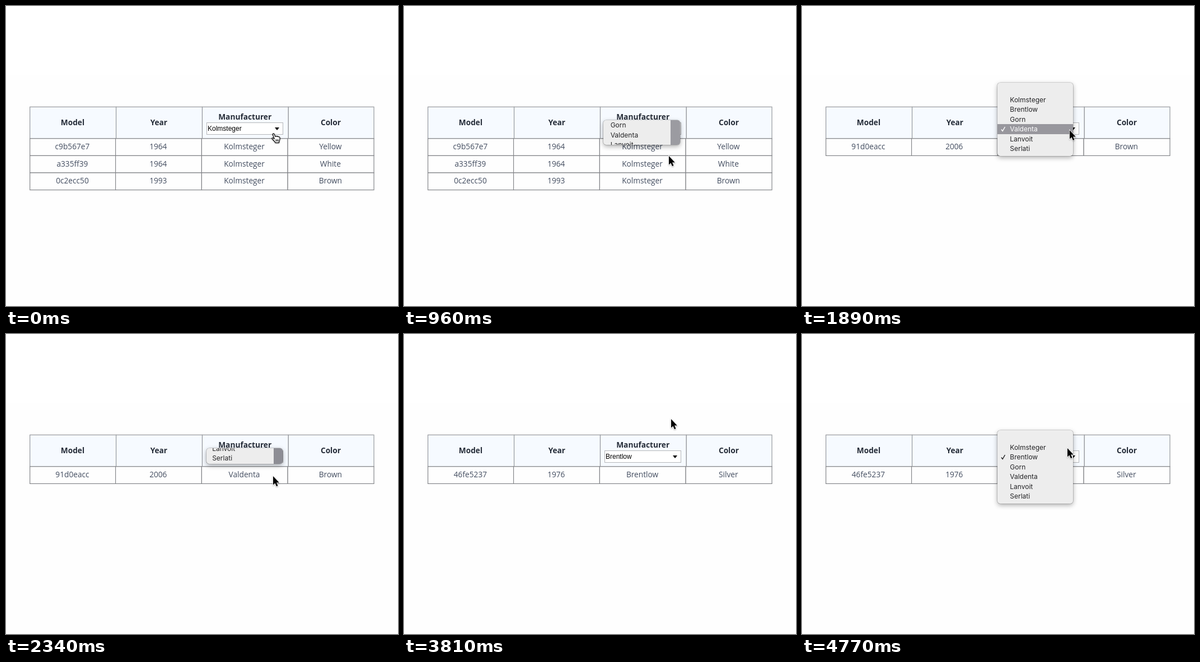
These frames come from a looping animation (700 px wide and 536 px high, 4800 ms). An HTML page:

```html
<!DOCTYPE html>
<html lang="en">
<head>
<meta charset="utf-8">
<title>Table column filter</title>
<style>
  html, body { margin: 0; width: 100%; height: 100%; overflow: hidden; background: #fff; }
  #screen {
    position: absolute; left: 0; top: 0; width: 700px; height: 536px;
    background: #fefefe; clip-path: inset(123px 0 0 0);
  }
  #screen div, #screen svg { position: absolute; box-sizing: border-box; }
  #table { left: 0; top: 0; text-anchor: middle; }
  #table rect { fill: #fefefe; stroke: #85878b; stroke-width: 1.2; }
  #table text { font: 13.7px "Open Sans", sans-serif; fill: #434d60; }
  #table .head rect { fill: #f6faff; stroke: #97999d; }
  #table .head text { font-weight: 700; fill: #252c38; }
  #select {
    left: 358px; top: 208px; width: 137px; height: 22px; padding-left: 1px;
    border: 1px solid #b4b6b9; background: #fff; color: #000;
    font: 12px/20px "Liberation Sans", Arial, sans-serif;
  }
  #select::after {
    content: ""; position: absolute; right: 6.5px; top: 8px;
    border: 4.5px solid transparent; border-top: 5px solid #000; border-bottom: 0;
  }
  #menu {
    overflow: hidden; border-radius: 5px; background: #ededed;
    box-shadow: 0 0 0 .6px rgba(0,0,0,.28), 0 3px 9px rgba(0,0,0,.32);
  }
  .item {
    left: 0; width: 100%; height: 17.5px; color: #242426;
    font: 12px/17.5px Inter, sans-serif; white-space: nowrap;
  }
  .item svg { left: 6px; top: 4px; fill: none; stroke: currentColor; stroke-width: 1.5; }
  .item.hover { background: #98979d; color: #fff; }
  #button { right: 0; top: 0; width: 16.5px; height: 100%; background: #87878f; }
  #cursor { left: 0; top: 0; overflow: visible; filter: drop-shadow(0 1px 1px rgba(0,0,0,.3)); }
</style>
</head>
<body>
<div id="screen">
  <svg id="table" width="700" height="536"></svg>
  <div id="select"></div>
  <div id="menu"><div id="button"></div></div>
  <svg id="cursor" width="20" height="22">
    <path id="arrow" d="M0 0V15.6L3.5 12.4 6 18.2 8.5 17.1 6 11.4H10.8Z"
      fill="#000" stroke="#fff" stroke-width="1.5" paint-order="stroke"/>
    <g id="hand" transform="translate(-3.5 -1)" fill="#fff" stroke="#000" stroke-width="1.2" stroke-linejoin="round">
      <path d="M4.6 8.6 2.4 3C1.6 .9 4.2 0 5 1.9L7 6.4C7.4 4.9 9.4 5 9.8 6.4 10.4 5.2 12 5.5 12.3 6.9 13.2 6 14.8 6.8 14.9 8.2 15.3 10.5 15.2 12 14 14L13.4 17.4H7C6.4 15 3.6 13 1.2 10.4 .2 9 2 8 3.2 9L5.2 10.6Z"/>
      <path d="M8 11.3v3.6M10 11.3v3.6M12 11.3v3.6" stroke-width="1"/>
    </g>
  </svg>
</div>
<script>
const LOOP = 4800, ROW = 17.5, LINE = 30.6, FOLD = 120, MENU_H = 131;
const makers = ["Kolmsteger", "Brentlow", "Gorn", "Valdenta", "Lanvoit", "Serlati"];
const cars = {
  0: [["c9b567e7", "1964", "Yellow"], ["a335ff39", "1964", "White"], ["0c2ecc50", "1993", "Brown"]],
  1: [["46fe5237", "1976", "Silver"]],
  3: [["91d0eacc", "2006", "Brown"]],
  5: [["691fd58d", "1982", "Yellow"]]
};
// Each visit to the menu: old and new choice, time opened, time clicked
const visits = [
  { from: 0, to: 3, open: 240, pick: 865 },
  { from: 3, to: 5, open: 1680, pick: 2220 },
  { from: 5, to: 1, open: 2880, pick: 3620 },
  { from: 1, to: 0, open: 4230, pick: 4770 }
];
// Pointer stops: time, x, y
const path = [
  [0, 477.5, 228], [240, 479, 221], [330, 479, 222], [800, 473, 268], [1140, 473, 268],
  [1560, 478, 222], [1920, 478, 222], [2160, 477, 254], [2640, 477, 254],
  [2880, 478, 222], [3150, 477, 218], [3240, 477, 165], [3330, 477, 152],
  [3990, 477, 152], [4230, 476, 220], [4440, 476, 220], [4680, 474, 204], [LOOP, 474, 204]
];

const $ = id => document.getElementById(id);
const mix = (a, b, p) => a + (b - a) * p;
const ease = p => p * p * (3 - 2 * p);
const show = (el, on) => { el.style.display = on ? "" : "none"; };
const place = (el, x, y, w, h) => Object.assign(el.style,
  { left: x + "px", top: y + "px", width: w + "px", height: h + "px" });

function addSvg(parent, tag, attrs = {}, text = "") {
  const el = document.createElementNS("http://www.w3.org/2000/svg", tag);
  for (const key in attrs) el.setAttribute(key, attrs[key]);
  el.textContent = text;
  parent.append(el);
  return el;
}

function addRow(parent, texts, edges, y, height, baseline) {
  texts.forEach((text, i) => {
    const x = edges[i], width = edges[i + 1] - x;
    addSvg(parent, "rect", { x, y, width, height });
    addSvg(parent, "text", { x: x + width / 2 - .7, y: baseline }, text);
  });
}

const head = addSvg($("table"), "g", { class: "head" });
addRow(head, ["Model", "Year", "Manufacturer", "Color"],
  [42.7, 196.6, 350.5, 504.3, 657], 180.3, 56.5, 213.3);
head.querySelectorAll("text")[2].setAttribute("y", 202.5);

const bodies = Object.entries(cars).map(([maker, rows]) => {
  const el = addSvg($("table"), "g");
  rows.forEach(([model, year, color], i) => addRow(el, [model, year, makers[maker], color],
    [42.7, 195.6, 349.4, 503.1, 657], 236.8 + LINE * i, LINE, 256.2 + LINE * i));
  return { maker: +maker, el };
});

const items = makers.map(name => {
  const el = document.createElement("div");
  el.className = "item";
  el.textContent = name;
  el.insertAdjacentHTML("beforeend", '<svg width="9" height="10"><path d="M1 5.5 3.2 8.5 7.5 1"/></svg>');
  $("menu").append(el);
  return { el, check: el.lastChild };
});
$("menu").append($("button"));

function pointer(t) {
  const i = path.findIndex(stop => stop[0] > t);
  const [t0, x0, y0] = path[i - 1], [t1, x1, y1] = path[i];
  const p = ease((t - t0) / (t1 - t0));
  return [mix(x0, x1, p), mix(y0, y1, p)];
}

// Value in force, given how long after the click it takes effect
function chosen(t, delay) {
  return visits.reduce((value, v) => t >= v.pick + delay ? v.to : value, 0);
}

function drawMenu(visit, t, py) {
  const fold = Math.max(0, (t - visit.pick - 30) / FOLD);
  const p = 1 - (1 - fold) ** 2;
  const top = 189 - ROW * visit.from;
  const boxTop = mix(top, 208, p), boxBottom = mix(top + MENU_H, 230, p);
  const left = mix(348.5, 358.5, p);
  place($("menu"), left, boxTop, mix(483.7, 495, p) - left, boxBottom - boxTop);

  // While folding, the picked row slides onto the select box
  const slide = mix(0, ROW * (visit.from - visit.to), p);
  const blink = t >= visit.pick && t < visit.pick + 30;
  items.forEach(({ el, check }, i) => {
    const y = top + 22.2 + ROW * i + slide;
    el.style.top = y - boxTop + "px";
    el.style.paddingLeft = mix(22.8, 9.5, p) + "px";
    el.classList.toggle("hover", !fold && !blink && py >= y && py < y + ROW);
    show(check, !fold && i === visit.from);
  });
  $("button").style.opacity = p;
}

function draw(t) {
  const [x, y] = pointer(t);
  const visit = visits.find(v => t >= v.open && t < v.pick + 30 + FOLD);
  const value = chosen(t, 30 + FOLD), filter = chosen(t, 60 + FOLD);

  $("select").textContent = makers[value];
  bodies.forEach(({ maker, el }) => show(el, maker === filter));
  show($("menu"), visit);
  if (visit) drawMenu(visit, t, y);

  const overSelect = !visit && y >= 208 && y < 230;
  show($("hand"), overSelect);
  show($("arrow"), !overSelect);
  $("cursor").style.transform = `translate(${x}px, ${y}px)`;
}

const start = performance.now();
function tick() {
  draw((performance.now() - start) % LOOP);
  requestAnimationFrame(tick);
}
tick();
</script>
</body>
</html>
```
